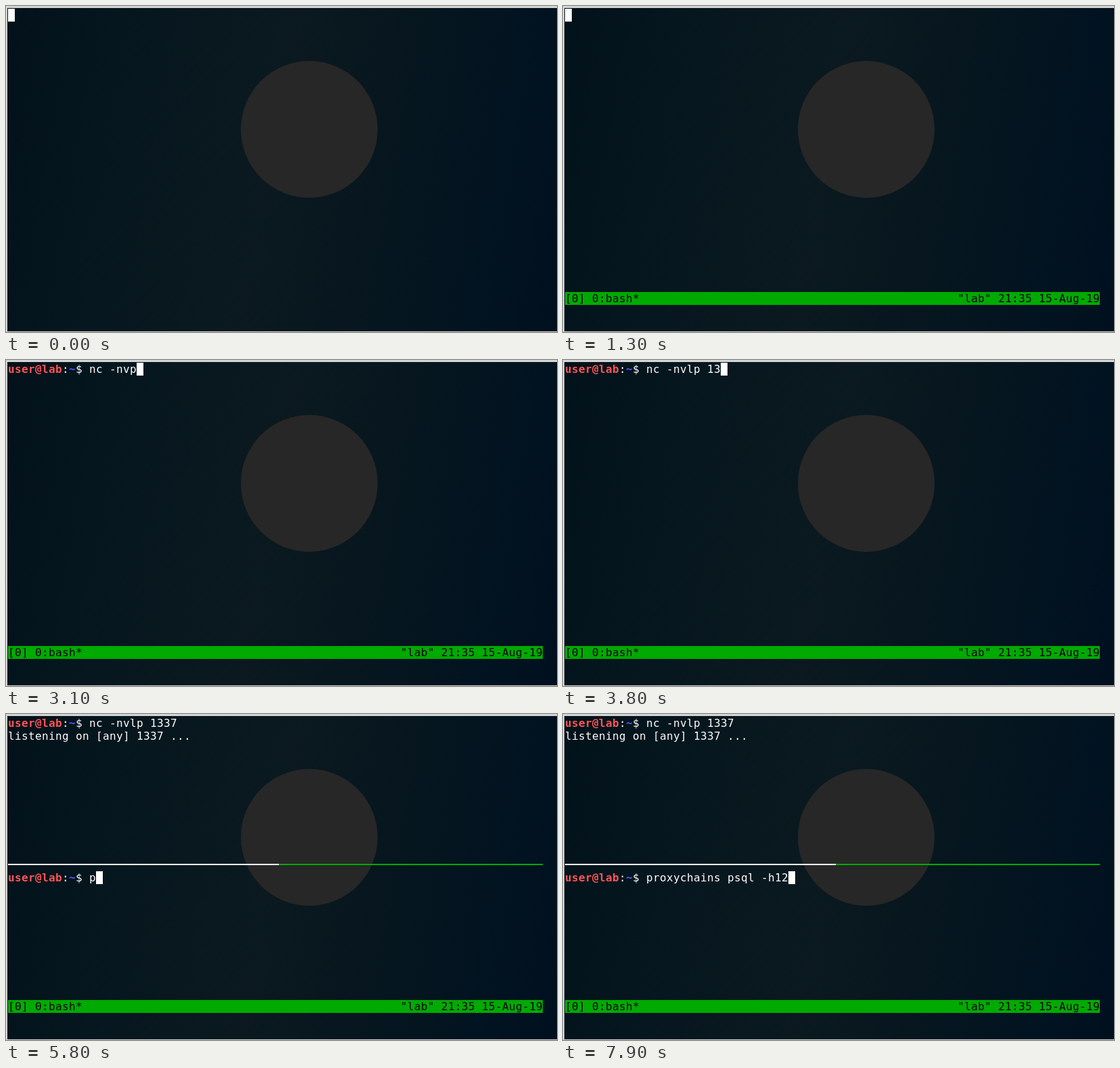
An HTML page with a canvas for the animation above (8000 ms loop, 814 px wide and 481 px high).

```html
<!DOCTYPE html>
<html lang="en">
<head>
<meta charset="utf-8">
<title>Terminal session</title>
<style>
  html, body { margin: 0; width: 100%; height: 100%; overflow: hidden; }
  body {
    background:
      repeating-linear-gradient(135deg, #0000 0 2px, #0001 2px 3px),
      linear-gradient(100deg, #02121b 0%, #06171f 22%, #0b1a20 48%, #07171f 65%, #021421 85%, #001020 100%);
  }
  canvas { display: block; }
</style>
</head>
<body>
<canvas id="stage" width="814" height="481"></canvas>
<script>
const ctx = document.getElementById('stage').getContext('2d');
const LOOP = 8000, LEFT = 3, TOP = 4, CELL = 10, LINE = 19, COLUMNS = 79;
const WHITE = '#fff', RED = '#ff5555', BLUE = '#5555ff', GREEN = '#00aa00', BORDER = '#d3d6d6';
const PROMPT_LENGTH = 12;

// Each entry: [start time in ms, what has been typed by then]
const launch = [[100, ''], [500, 't'], [600, 'tm'], [700, 'tmu'], [800, 'tmux']];
const listen = [
  [1400, ''], [1700, 'n'], [1800, 'nc'], [1900, 'nc '], [2000, 'nc -'],
  [2200, 'nc -n'], [2300, 'nc -nv'], [2400, 'nc -nvpl'], [2600, 'nc -nvpl '],
  [3000, 'nc -nvpl'], [3100, 'nc -nvp'], [3300, 'nc -nv'], [3400, 'nc -nvl'],
  [3500, 'nc -nvlp '], [3700, 'nc -nvlp 1'], [3800, 'nc -nvlp 13'],
  [3900, 'nc -nvlp 133'], [4000, 'nc -nvlp 1337']
];
const connectCommand = 'proxychains psql -h12';
// Each entry: [start time in ms, number of characters typed]
const connect = [
  [4900, 0], [5800, 1], [6100, 2], [6200, 3], [6300, 4], [6400, 5], [6500, 6],
  [6600, 8], [6700, 9], [6800, 10], [6900, 12], [7000, 14], [7100, 15],
  [7300, 17], [7500, 18], [7700, 19], [7800, 20], [7900, 21]
];

const latest = (steps, time) => steps.filter(([start]) => start <= time).pop()?.[1];

function rect(x, y, width, height, color) {
  ctx.fillStyle = color;
  ctx.fillRect(x, y, width, height);
}

function write(text, column, row, color = WHITE, weight = 'normal') {
  ctx.font = `${weight} 16px "DejaVu Sans Mono", monospace`;
  ctx.fillStyle = color;
  [...text].forEach((char, i) =>
    ctx.fillText(char, LEFT + (column + i) * CELL, TOP + row * LINE + 15));
}

function cursor(column, row) {
  rect(LEFT + column * CELL, TOP + row * LINE, CELL, LINE, WHITE);
}

function commandLine(command, row, active = true) {
  write('user@lab', 0, row, RED, 'bold');
  write(':', 8, row);
  write('~', 9, row, BLUE, 'bold');
  write('$ ' + command, 10, row);
  if (active) cursor(PROMPT_LENGTH + command.length, row);
}

function statusBar(program) {
  const clock = '"lab" 21:35 15-Aug-19';
  rect(LEFT, TOP + 22 * LINE, COLUMNS * CELL, LINE, GREEN);
  write(`[0] 0:${program}*`, 0, 22, '#000');
  write(clock, COLUMNS - clock.length, 22, '#000');
}

function backdrop() {
  ctx.clearRect(0, 0, 814, 481);
  ctx.fillStyle = '#272727';
  ctx.beginPath();
  ctx.arc(448, 182, 101, 0, Math.PI * 2);
  ctx.fill();
  rect(0, 0, 814, 3, BORDER);
  rect(0, 0, 2, 481, BORDER);
  rect(0, 480, 814, 1, BORDER);
}

function draw(time) {
  backdrop();
  if (time < 100 || (time >= 1000 && time < 1400)) cursor(0, 0);
  else if (time < 1000) {
    commandLine(latest(launch, time), 0, time < 900);
    if (time >= 900) cursor(0, 1);
  } else {
    commandLine(latest(listen, time), 0, time < 4200);
  }

  if (time >= 1300) statusBar(time >= 4600 && time < 5100 ? 'nc' : 'bash');

  if (time >= 4200) {
    write('listening on [any] 1337 ...', 0, 1);
    if (time < 4900) cursor(0, 2);
  }
  if (time >= 4900) {
    rect(LEFT, 221, 40 * CELL, 2, WHITE);
    rect(LEFT + 40 * CELL, 221, 39 * CELL, 2, GREEN);
    commandLine(connectCommand.slice(0, latest(connect, time)), 12);
  }
}

function frame() {
  draw(performance.now() % LOOP);
  requestAnimationFrame(frame);
}
frame();
</script>
</body>
</html>
```
